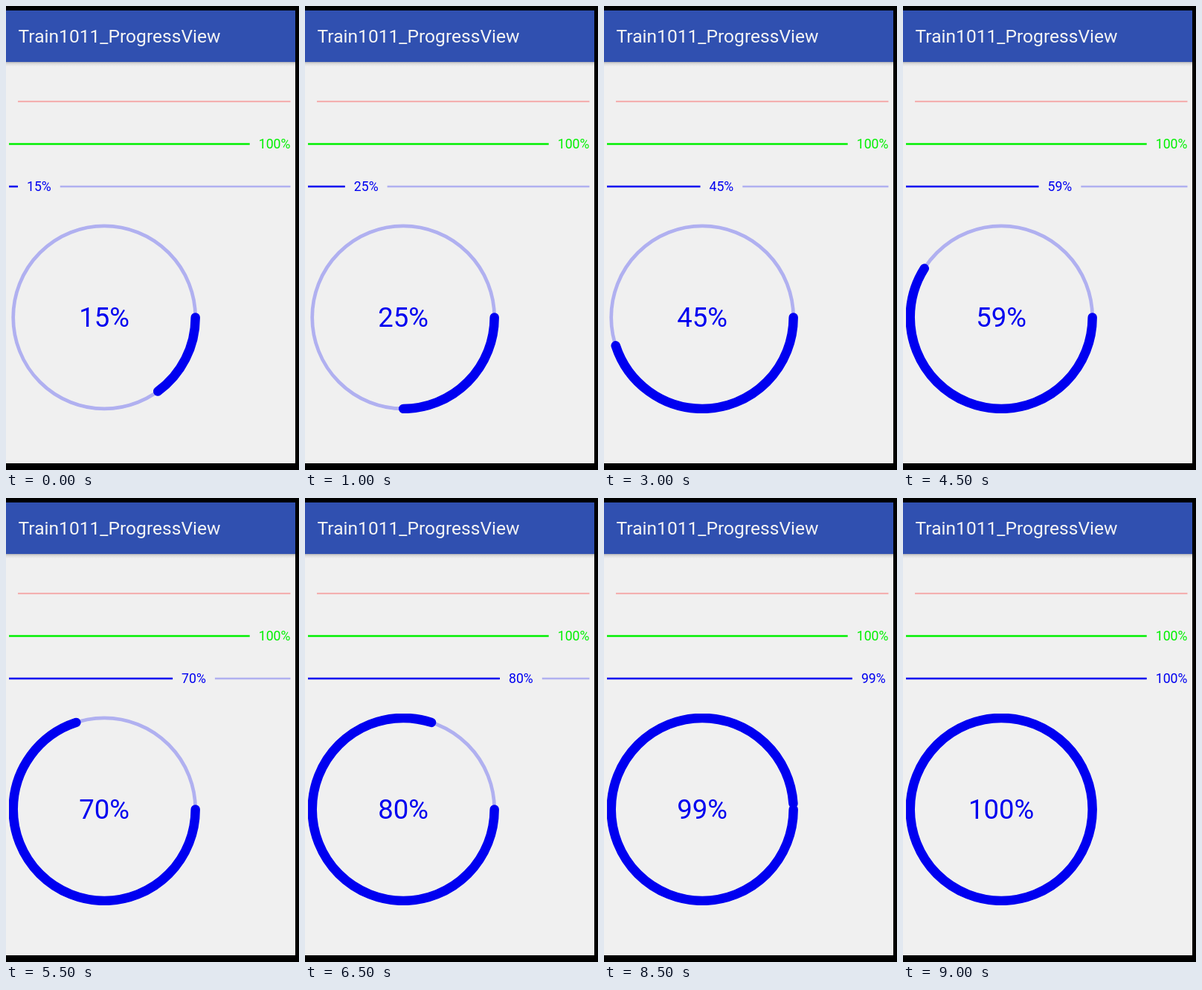
These frames come from a looping animation (394 px wide and 622 px high, 9.5 s). An HTML page with a canvas:

```html
<!DOCTYPE html>
<html lang="en">
<head>
<meta charset="utf-8">
<title>Progress views</title>
<style>
  html, body { margin: 0; width: 100%; height: 100%; overflow: hidden; background: #000; }
  canvas { display: block; }
</style>
</head>
<body>
<canvas id="stage" width="394" height="622"></canvas>
<script>
const ctx = document.getElementById('stage').getContext('2d');

const LOOP = 9500, STEP = 500;
const LEVELS = [15, 20, 25, 30, 35, 40, 45, 50, 55, 59, 65, 70, 75, 80, 84, 89, 94, 99, 100];

const PAPER = '#f0f0f0', BLUE = '#0000f0', PALE_BLUE = '#b0b0f0';
const GREEN = '#00f000', PALE_RED = '#f4b0b0';
const LEFT = 4, RIGHT = 382.5, GAP = 12;
const RING = { x: 132.2, y: 417.4, r: 122.5 };

function text(str, x, y, size, color, align = 'left') {
  ctx.font = `${size}px Roboto, sans-serif`;
  ctx.textAlign = align;
  ctx.fillStyle = color;
  ctx.fillText(str, x, y);
}

function line(x1, x2, y, width, color) {
  if (x2 <= x1) return;
  ctx.fillStyle = color;
  ctx.fillRect(x1, y - width / 2, x2 - x1, width);
}

function bar(y, percent, color, pale) {
  const label = percent + '%', size = 17.7;
  ctx.font = `${size}px Roboto, sans-serif`;
  const end = LEFT + (RIGHT - LEFT) * percent / 100;
  const start = end - ctx.measureText(label).width;
  line(LEFT, start - GAP, y, 2.5, color);
  line(end + GAP, RIGHT, y, 2.5, pale);
  text(label, start, y + 6, size, color);
}

function arc(turn, width, color) {
  ctx.beginPath();
  ctx.arc(RING.x, RING.y, RING.r, 0, turn * Math.PI * 2);
  ctx.lineWidth = width;
  ctx.lineCap = 'round';
  ctx.strokeStyle = color;
  ctx.stroke();
}

function ring(percent) {
  ctx.save();
  ctx.beginPath();
  ctx.rect(LEFT, 289, 257, 257);
  ctx.clip();
  arc(1, 4.7, PALE_BLUE);
  arc(percent / 100, 12.5, BLUE);
  ctx.restore();
  text(percent + '%', RING.x, 430, 36.5, BLUE, 'center');
}

function screen() {
  ctx.fillStyle = '#000';
  ctx.fillRect(0, 0, 394, 622);
  ctx.fillStyle = PAPER;
  ctx.fillRect(0, 6, 389, 607);
  const shade = ctx.createLinearGradient(0, 75, 0, 81);
  shade.addColorStop(0, '#b4b4b8');
  shade.addColorStop(0.4, '#dcdcdc');
  shade.addColorStop(1, PAPER);
  ctx.fillStyle = shade;
  ctx.fillRect(0, 75, 389, 6);
  ctx.fillStyle = '#3050b0';
  ctx.fillRect(0, 6, 389, 69);
  text('Train1011_ProgressView', 16.5, 49, 24.6, '#f4f4f4');
}

function draw(now) {
  const percent = LEVELS[Math.floor((now % LOOP) / STEP)];
  screen();
  line(LEFT + GAP, RIGHT, 128, 2.2, PALE_RED);
  bar(185, 100, GREEN, PAPER);
  bar(242, percent, BLUE, PALE_BLUE);
  ring(percent);
}

let began;
function tick(now) {
  began ??= now;
  draw(Math.max(0, now - began));
  requestAnimationFrame(tick);
}
draw(0);
requestAnimationFrame(tick);
</script>
</body>
</html>
```
